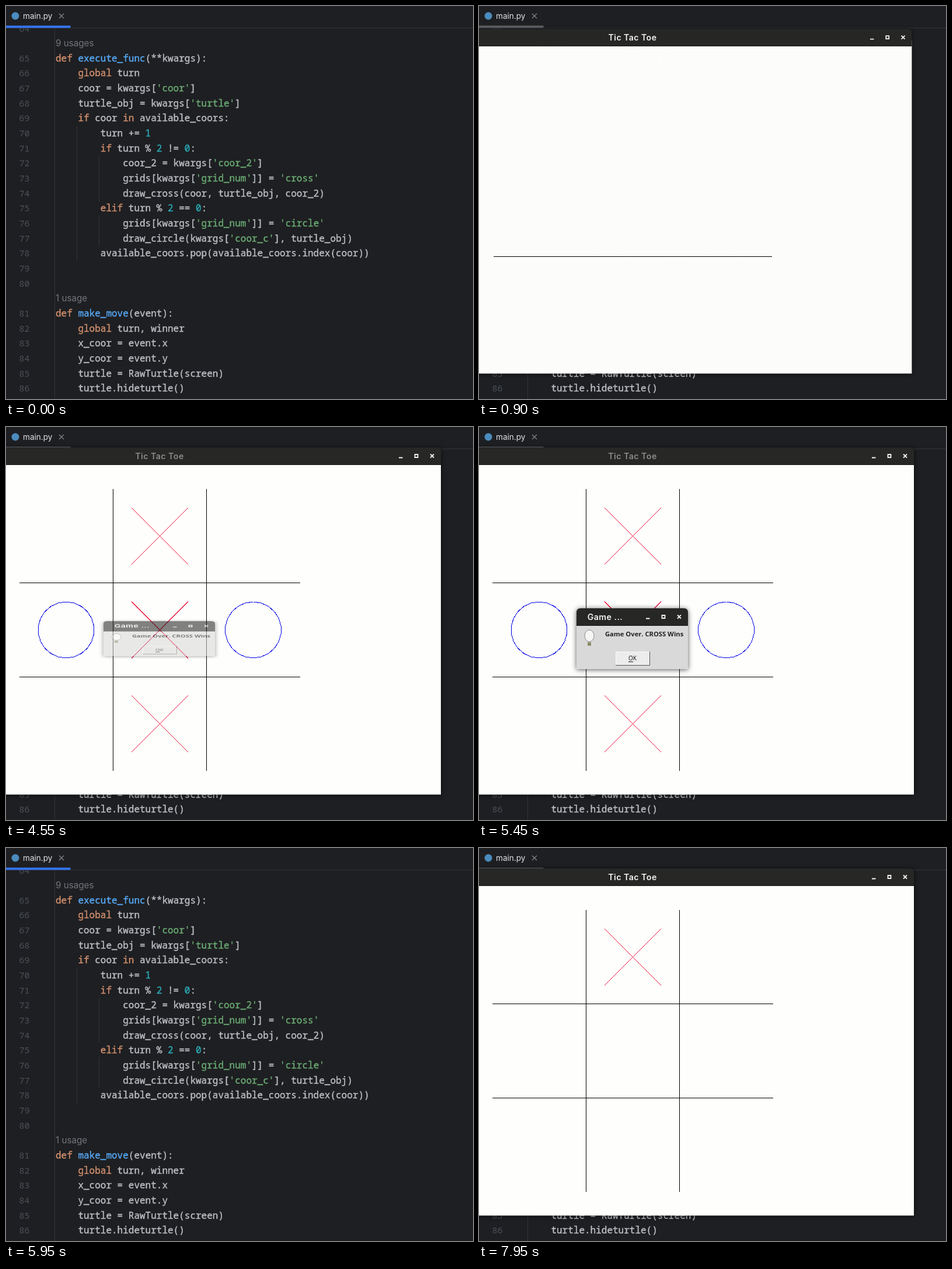
An HTML page for the animation above (8 s loop, 800 by 672 pixels).

```html
<!DOCTYPE html>
<html lang="en">
<head>
<meta charset="utf-8">
<title>Noughts and crosses</title>
<style>
  html, body { margin: 0; width: 100%; height: 100%; overflow: hidden; background: #1e1f22; }
  svg { display: block; }
  .code { font: 16px "Noto Sans Mono", "DejaVu Sans Mono", monospace; color: #bcbec4; }
  .code, .code tspan { fill: currentColor; stroke: currentColor; stroke-width: .4; }
  .num { font: 15px "Noto Sans Mono", "DejaVu Sans Mono", monospace; fill: #4b5059; }
  .hint { font: 15.2px Inter, sans-serif; fill: #72757b; }
  .tab { font: 13.6px Inter, sans-serif; fill: #dfe1e5; }
  .title { font: 600 14.2px Inter, "Open Sans", sans-serif; letter-spacing: .45px; fill: #f4f4f2; text-anchor: middle; }
  .dim { fill: #8b8b89; }
  .message { font: bold 11.2px "Open Sans", "Noto Sans", sans-serif; fill: #222; }
  .label { font: 10px "Open Sans", "Noto Sans", sans-serif; fill: #111; text-anchor: middle; }
  .kw { color: #cf8e6d; }
  .fn { color: #56a8f5; }
  .str { color: #6aab73; }
  .lit { color: #2aacb8; }
  .rule { stroke: #313438; }
  .frame { filter: drop-shadow(0 1px 4px rgba(0, 0, 0, .65)); }
  .mark { fill: none; shape-rendering: crispEdges; }
</style>
</head>
<body>
<svg width="800" height="672" viewBox="0 0 800 672">
  <rect width="800" height="672" fill="#1e1f22"/>
  <path class="rule" d="M83.5 38V672M121.5 205V436M159.5 256V334M159.5 358V411"/>
  <g id="editor"></g>
  <rect width="800" height="37" fill="#1e1f22"/>
  <path class="rule" d="M0 37.5H800"/>
  <rect id="underline" y="33.5" width="110.5" height="4"/>
  <circle cx="16" cy="17" r="6.5" fill="#4b8bbe"/>
  <text class="tab" x="29" y="21.5">main.py</text>
  <path d="M91 13l8 8m0-8l-8 8" stroke="#868a91" stroke-width="1.1"/>
  <g id="game"></g>
  <g id="dialog"></g>
</svg>
<script>
const LOOP = 8000, STEP = 50, CLOSE = 5550, GONE = 5700;
const $ = id => document.getElementById(id);

const source = `
9 usages
def execute_func(**kwargs):
    global turn
    coor = kwargs['coor']
    turtle_obj = kwargs['turtle']
    if coor in available_coors:
        turn += 1
        if turn % 2 != 0:
            coor_2 = kwargs['coor_2']
            grids[kwargs['grid_num']] = 'cross'
            draw_cross(coor, turtle_obj, coor_2)
        elif turn % 2 == 0:
            grids[kwargs['grid_num']] = 'circle'
            draw_circle(kwargs['coor_c'], turtle_obj)
        available_coors.pop(available_coors.index(coor))


1 usage
def make_move(event):
    global turn, winner
    x_coor = event.x
    y_coor = event.y
    turtle = RawTurtle(screen)
    turtle.hideturtle()`;

const keywords = ["def", "global", "if", "elif", "in"];
const tokens = /'[^']*'|\b\d+\b|\b(?:def|global|if|elif|in)\b|(?<=def )\w+/g;

function paint(token) {
  const kind = token[0] === "'" ? "str" : /^\d/.test(token) ? "lit"
    : keywords.includes(token) ? "kw" : "fn";
  return `<tspan class="${kind}">${token}</tspan>`;
}

let number = 64;
$("editor").innerHTML = source.split("\n").map((line, row) => {
  const y = 43.5 + row * 25.66;
  if (/^\d usage/.test(line)) return `<text class="hint" x="85" y="${y}">${line}</text>`;
  const text = line.trim(), x = 85 + 9.6 * (line.length - text.length);
  return `<text class="num" x="22.5" y="${y}">${number++}</text>` +
    `<text class="code" x="${x}" y="${y}">${text.replace(tokens, paint)}</text>`;
}).join("");

// A desktop window: title bar 30 px high with three buttons at the right.
function frame(x, y, w, h, title, titleX, fill) {
  const r = x + w, mid = y + 14.5;
  return `<g class="frame"><rect x="${x}" y="${y + 20}" width="${w}" height="${h - 20}" fill="${fill}"/>
    <path d="M${x} ${y + 30}v-23q0-7 7-7h${w - 14}q7 0 7 7v23z" fill="#272725"/></g>
    <path d="M${x} ${y + 29.5}h${w}" stroke="#1a1a19"/>
    <text class="title" x="${titleX}" y="${y + 19.5}">${title}</text>
    <path d="M${r - 72} ${mid + 3}h6.5M${r - 44.5} ${mid - 2.5}h5v5h-5zM${r - 18} ${mid - 3}l6 6m0-6l-6 6"
      fill="none" stroke="#f4f4f2" stroke-width="1.8"/>`;
}

$("game").innerHTML = frame(-218, 35, 963, 593.5, "Tic Tac Toe", 263, "#fefefc");
$("dialog").innerHTML = frame(167, 310, 191, 104, "Game ...", 216, "#d9d9d9") + `
  <ellipse cx="189" cy="357" rx="8" ry="10" fill="#f6f6f4" stroke="#8c8c8c"/>
  <path d="M186 368h6v6h-6z" fill="#8d8d68"/>
  <text class="message" x="216" y="358">Game Over. CROSS Wins</text>
  <rect id="ok" x="234.5" y="384.5" width="58" height="23" stroke="#f8f8f8"/>
  <path d="M234 407.5h58.5V384" fill="none" stroke="#555"/>
  <text class="label" x="263" y="399">OK</text>
  <path d="M256 401.5h8" stroke="#111"/>`;

const marks = [];
function mark(d, stroke, from) {
  const el = document.createElementNS("http://www.w3.org/2000/svg", "path");
  el.setAttribute("class", "mark");
  el.setAttribute("d", d);
  el.setAttribute("stroke", stroke);
  $("game").append(el);
  marks.push({ el, from });
}

function grid(from) {
  ["M23 427.5H504", "M23 266.5H504", "M183.5 106V588", "M343.5 106V588"]
    .forEach((d, i) => mark(d, "#000", from + i * STEP));
}

function cross(y, from) {
  mark(`M215 ${y - 48.5}l97 97`, "#f0143c", from);
  mark(`M312 ${y - 48.5}l-97 97`, "#ea1848", from + STEP);
}

// The pen walks a 22-sided ring counterclockwise from the bottom, half at a time.
function ring(x, from, next) {
  const half = first => "M" + Array.from({ length: 12 }, (_, i) => {
    const a = (first + i) * Math.PI / 11;
    return `${x + 48 * Math.sin(a)} ${347 + 48 * Math.cos(a)}`;
  }).join("L");
  mark(half(0), "#0000e6", from);
  mark(half(11), "#0000e6", next);
}

grid(900);
cross(347, 1950);
ring(103, 2600, 2650);
cross(186.5, 3000);
ring(423.5, 3900, 4000);
cross(507.5, 4350);
grid(6800);
cross(186.5, 7750);

const progress = (t, start, length) => Math.min(1, Math.max(0, (t - start) / length));
const outExpo = p => p >= 1 ? 1 : 1 - 2 ** (-10 * p);
const outQuad = p => 1 - (1 - p) ** 2;

function pose(el, x, y, sx, sy, opacity) {
  el.setAttribute("visibility", opacity > 0 ? "visible" : "hidden");
  el.setAttribute("opacity", opacity);
  el.setAttribute("transform", `translate(${x} ${y}) scale(${sx} ${sy}) translate(${-x} ${-y})`);
}

function draw(t) {
  const second = t >= GONE;
  const open = second && t < 6750 ? 0 : outExpo(progress(t, second ? 6689 : 794, 150));
  const close = second ? 0 : outQuad(progress(t, CLOSE, 150));
  const game = $("game"), shrink = 1 - .2 * close;
  if (close > 0) pose(game, 263.5, 331.5, shrink, shrink, 1 - close);
  else pose(game, 263.5, 628.5, .01 + .99 * open, .05 + .95 * open, open);

  for (const { el, from } of marks) {
    const on = t >= from && (from > GONE || !second);
    el.style.display = on ? "" : "none";
  }

  const pop = outQuad(progress(t, 4515, 100)) - outQuad(progress(t, CLOSE, 100));
  pose($("dialog"), 263, 362, 1, pop, pop);
  $("ok").setAttribute("fill", t >= 5450 ? "#ececec" : "#d9d9d9");
  game.querySelector(".title").classList.toggle("dim", t >= 4500 && t < GONE);

  const unfocused = t >= 750 && t < 5600 || t >= 6750;
  $("underline").setAttribute("fill", unfocused ? "#5f6166" : "#3574f0");
}

function tick() {
  const t = performance.now() % LOOP;
  draw(Math.floor(t / STEP) * STEP);
  requestAnimationFrame(tick);
}
tick();
</script>
</body>
</html>
```
